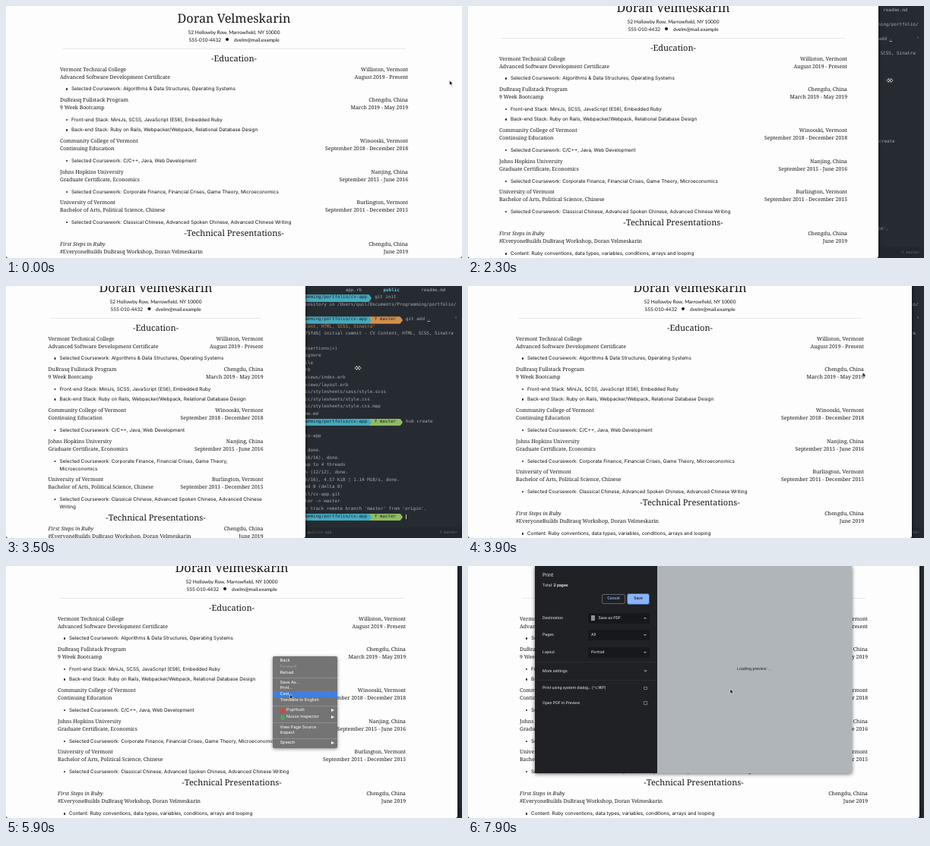
Write an HTML page that moves like this. It is 600x332 px and loops after 8 s.

```html
<!DOCTYPE html>
<html lang="en">
<head>
<meta charset="utf-8">
<title>Resume print demo</title>
<style>
html, body { margin: 0; width: 100%; height: 100%; overflow: hidden; }
body { text-rendering: geometricPrecision; }
#stage { position: relative; width: 600px; height: 332px; overflow: hidden; background: #262b31; }
#stage, #stage * { box-sizing: border-box; }
.abs, #win, #cv, #menu, #menu *, #dialog, #dialog *, #stage > svg, #bar, #thumb { position: absolute; }

/* terminal */
#term { left: 308px; top: 1.7px; isolation: isolate; color: #a4abb3; font: 5.92px/9.62px "DejaVu Sans Mono", monospace; }
#term div { height: 9.62px; white-space: pre; }
.seg { display: inline-block; position: relative; color: #1d2329; height: 9.62px;
  clip-path: polygon(0 0, calc(100% - 3.5px) 0, 100% 50%, calc(100% - 3.5px) 100%, 0 100%); }
.path { background: #45a9bd; padding-right: 6px; z-index: 1; }
.git { background: #8fbb62; padding: 0 9px 0 7px; margin-left: -3.5px; }
.dirty { background: #d2904a; }
.cmd { margin-left: 4px; }
.str { color: #d0823f; }
.dir { color: #56c4d8; font-weight: bold; }
#status { left: 300px; top: 318px; width: 300px; height: 14px; background: #22272d; color: #697078;
  font: 4.9px/14px "DejaVu Sans Mono", monospace; }
#status span { position: absolute; }

/* page */
#win { left: 0; top: 0; height: 332px; background: #fdfdfd; overflow: hidden;
  border-radius: 0 0 3px 3px; box-shadow: 0 0 5px #000b; }
#cv { top: 0; color: #161616; font: 6.9px/10px "Noto Serif", serif; }
#cv h1, #cv h2 { margin: 0; text-align: center; font-weight: 300; white-space: nowrap; }
#cv h1 { font-size: 16.2px; line-height: 20px; padding-top: 6px; height: 30.5px; }
#cv h2 { font-size: 11px; line-height: 10px; margin: -1px 0 5.7px; }
#cv hr { border: 0; margin: 5px 3px 9px; height: 1px; background: #e8e8e8; }
.contact { font: 6.5px/10px Lato, sans-serif; color: #111; text-align: center; white-space: nowrap; }
.contact i { display: inline-block; width: 4px; height: 4px; border-radius: 2px; background: #111; margin: 0 6.5px .4px; }
.entry { padding-bottom: 2.9px; }
.row { display: flex; justify-content: space-between; white-space: nowrap; position: relative; top: -.7px; }
#cv ul { margin: 4.3px 0 0; padding: 0 0 0 15px; list-style: none; font: 6.36px/10px Inter, sans-serif; color: #111; }
#cv li { position: relative; margin-bottom: 3.4px; }
#cv li::before { content: ""; position: absolute; left: -7.5px; top: 4px; width: 2.2px; height: 2.2px; border-radius: 2px; background: #222; }
#bar { right: 0; top: 0; width: 6px; height: 332px; background: #f6f6f6; border-left: 1px solid #e3e3e3; }
#thumb { left: 0; width: 4.5px; height: 179px; border-radius: 2px; background: #777; }

/* context menu */
#menu { left: 351px; top: 119px; width: 85px; height: 120.5px; background: #747474; border-radius: 2px;
  box-shadow: 0 1px 4px #0007; color: #fff; font: 5.55px/8px Inter, sans-serif; }
.item { left: 0; width: 85px; height: 8px; padding-left: 9.5px; white-space: nowrap; }
.item.off { color: #a3a3a3; }
.item.on { background: #3f7fe0; }
.item b { right: 4.5px; top: 2px; border: 2px solid transparent; border-left: 4px solid #fff; border-right: 0; }
.item i { left: 9.5px; top: 1px; width: 6.5px; height: 6.5px; border-radius: 50%; }
.item.icon { padding-left: 18px; }
.sep { left: 0; width: 85px; height: 1px; background: #8d8d8d; }

/* print dialog */
#dialog { left: 88px; top: 0; width: 417px; height: 273px; background: #202124; box-shadow: 0 1px 5px #0009;
  color: #e2e4e8; font: 5.35px/8px Roboto, sans-serif; }
#dialog * { white-space: nowrap; }
#dialog strong { position: static; }
#side, #pane { top: 0; height: 273px; }
#side { left: 0; width: 161px; }
#pane { left: 161px; width: 256px; background: #b0b5ba; }
.btn { top: 37px; height: 13px; border-radius: 2px; text-align: center; line-height: 11px; font-weight: 500; border: 1px solid #5f6368; color: #8ab4f8; }
.btn.main { background: #8ab4f8; color: #202124; border-color: #8ab4f8; box-shadow: 0 0 0 1px #3f5f94; }
.pick { left: 70px; width: 81px; height: 14px; border-radius: 2px; background: #17181b; line-height: 14px; padding-left: 4px; }
.pick::after { content: ""; position: absolute; right: 4px; top: 6px; border: 2px solid transparent; border-top: 2.5px solid #9aa0a6; border-bottom: 0; }
.rule { left: 0; width: 161px; height: 1px; background: #2c2d31; }
.ext { left: 143px; width: 4.5px; height: 4.5px; border: 1px solid #6d7176; }
#load { left: 105px; top: 132px; color: #222529; }
</style>
</head>
<body>
<div id="stage">
  <div id="term" class="abs"></div>
  <div id="status" class="abs"><span style="left:96px">quil/cv-app</span><span style="right:6px">Y master</span></div>
  <div id="win"><div id="cv"></div><div id="bar"><div id="thumb"></div></div></div>
  <div id="menu"></div>
  <div id="dialog">
    <div id="pane"><div id="load">Loading preview</div></div>
    <div id="side"></div>
  </div>
  <svg id="arrow" style="left:0;top:0" width="8" height="10" viewBox="-1 -1 8 10"><path d="M0 0V6.3L1.5 5 2.5 7.3 3.6 6.8 2.6 4.6H4.6Z" fill="#111" stroke="#fff" stroke-width=".6"/></svg>
  <svg id="resize" style="left:0;top:0" width="12" height="8" viewBox="-6 -4 12 8"><path d="M-4.2 0L-1.4-2.5V-.7H1.4V-2.5L4.2 0 1.4 2.5V.7H-1.4V2.5Z" fill="#111" stroke="#fff" stroke-width=".7"/></svg>
</div>
<script>
const $ = id => document.getElementById(id);

// Resume
const entry = (a, b, c, d, ...points) => `<div class="entry"><div class="row"><span>${a}</span><span>${b}</span></div>
  <div class="row"><span>${c}</span><span>${d}</span></div><ul>${points.map(p => `<li>${p}</li>`).join('')}</ul></div>`;
const course = 'Selected Coursework: ';
$('cv').innerHTML = `<h1>Doran Velmeskarin</h1>
  <div class="contact">52 Hollowby Row, Marrowfield, NY 10000</div>
  <div class="contact">555-010-4432<i></i>dvelm@mail.example</div><hr><h2>-Education-</h2>` +
  entry('Vermont Technical College', 'Williston, Vermont', 'Advanced Software Development Certificate', 'August 2019 - Present',
    course + 'Algorithms &amp; Data Structures, Operating Systems') +
  entry('DuBrasq Fullstack Program', 'Chengdu, China', '9 Week Bootcamp', 'March 2019 - May 2019',
    'Front-end Stack: MiniJs, SCSS, JavaScript (ES6), Embedded Ruby',
    'Back-end Stack: Ruby on Rails, Webpacker/Webpack, Relational Database Design') +
  entry('Community College of Vermont', 'Winooski, Vermont', 'Continuing Education', 'September 2018 - December 2018',
    course + 'C/C++, Java, Web Development') +
  entry('Johns Hopkins University', 'Nanjing, China', 'Graduate Certificate, Economics', 'September 2015 - June 2016',
    course + 'Corporate Finance, Financial Crises, Game Theory, Microeconomics') +
  entry('University of Vermont', 'Burlington, Vermont', 'Bachelor of Arts, Political Science, Chinese', 'September 2011 - December 2015',
    course + 'Classical Chinese, Advanced Spoken Chinese, Advanced Chinese Writing') +
  '<h2>-Technical Presentations-</h2>' +
  entry('<em>First Steps in Ruby</em>', 'Chengdu, China', '#EveryoneBuilds DuBrasq Workshop, Doran Velmeskarin', 'June 2019',
    'Content: Ruby conventions, data types, variables, conditions, arrays and looping') +
  entry('<em>Chat Kit</em>', 'Chengdu, China', 'Final Project Demo', 'May 2019');

// Terminal
const prompt = (cmd, git) => '<span class="seg path">       ~/Documents/Programming/portfolio/cv-app</span>' +
  (git ? `<span class="seg git ${git}">Y master</span>` : '') + `<span class="cmd">${cmd}</span>`;
const made = ['.gitignore', 'Gemfile', 'app.rb', 'app/views/index.erb', 'app/views/layout.erb', 'public/stylesheets/sass/style.scss',
  'public/stylesheets/style.css', 'public/stylesheets/style.css.map', 'readme.md'].map(f => ' create mode 100644 ' + f);
$('term').innerHTML = [
  ' '.repeat(39) + 'app.rb        <span class="dir">public</span>        readme.md',
  prompt('git init'),
  'Initialized empty Git repository in /Users/quil/Documents/Programming/portfolio/', '',
  prompt('git add <u>.</u>         <span class="str">"</span>', 'dirty'),
  `<span class="str">${'CV Content, HTML, SCSS, Sinatra"'.padStart(50)}</span>`,
  '[master (root-commit) 3a75fd6] initial commit - CV Content, HTML, SCSS, Sinatra', '',
  ' 12 files changed, 250 insertions(+)', ...made,
  prompt('hub create', 'clean'), '',
  'https://github.com/quil/cv-app', '',
  'Enumerating objects: 16, done.', 'Counting objects: 100% (16/16), done.',
  'Delta compression using up to 4 threads', 'Compressing objects: 100% (12/12), done.',
  'Writing objects: 100% (16/16), 4.57 KiB | 1.14 MiB/s, done.',
  'Total 16 (delta 0), reused 0 (delta 0)', 'To https://github.com/quil/cv-app.git',
  ' * [new branch]      master -> master',
  "Branch 'master' set up to track remote branch 'master' from 'origin'.",
  prompt('<span style="border-left:1px solid #c8ced4"> </span>', 'clean'),
].map(l => `<div>${l}</div>`).join('');

// Context menu: label, centre y, class, icon colour
const items = [['Back', 125], ['Forward', 132.7, 'off'], ['Reload', 140.5], ['Save As...', 153.5], ['Print...', 161.4],
  ['Cast...', 169.3], ['Translate to English', 177.2], ['PopHush', 190.3, 'icon', '#cf4a3c'],
  ['Nuvox Inspector', 199, 'icon', '#5c9a6c'], ['View Page Source', 212.5], ['Inspect', 220.4], ['Speech', 233.4]];
$('menu').innerHTML = items.map(([label, y, cls = '', color]) =>
  `<div class="item ${cls}" style="top:${y - 123}px">${color ? `<i style="background:${color}"></i>` : ''}${label}${color || label == 'Speech' ? '<b></b>' : ''}</div>`).join('') +
  [147, 183.5, 206, 227].map(y => `<div class="sep" style="top:${y - 119}px"></div>`).join('');
const rows = [...document.querySelectorAll('.item')];

// Print dialog
const label = (text, y, size = 5.35) => `<div style="left:10px;top:${y - 4}px;font-size:${size}px">${text}</div>`;
const pick = (name, y, value) => label(name, y) + `<div class="pick" style="top:${y - 7}px">${value}</div>`;
const ext = y => `<div class="ext" style="top:${y - 2.2}px"></div>`;
$('side').innerHTML = label('Print', 12, 6.8) + label('Total: <strong>2 pages</strong>', 25.5) +
  '<div class="btn" style="left:88px;width:31px">Cancel</div><div class="btn main" style="left:122px;width:28px">Save</div>' +
  pick('Destination', 68.5, '<i style="left:4px;top:3.5px;width:5px;height:7px;background:#8d9196"></i><span style="left:13.5px">Save as PDF</span>') +
  pick('Pages', 91, 'All') + pick('Layout', 113.5, 'Portrait') +
  '<div class="rule" style="top:126px"></div>' + label('More settings', 138.5) +
  '<div style="left:143.5px;top:136px;width:3px;height:3px;border:solid #9aa0a6;border-width:0 .8px .8px 0;transform:rotate(45deg)"></div>' +
  '<div class="rule" style="top:150px"></div>' +
  label('Print using system dialog… (⌥⌘P)', 161) + ext(161) + label('Open PDF in Preview', 180.5) + ext(180.5);
for (let i = 0; i < 3; i++) $('load').insertAdjacentHTML('beforeend', `<span class="dot" style="left:${39 + i * 2.6}px">.</span>`);
const dots = [...document.querySelectorAll('.dot')];

// Keys are [time, value, ...]
const widths = [[2000, 600], [2100, 592], [2300, 540], [2500, 470], [2700, 422], [2800, 416], [2900, 414], [3000, 406],
  [3200, 396], [3500, 394], [3600, 430], [3700, 500], [3800, 570], [3900, 584], [4000, 591], [4200, 594]];
const scrolls = [[700, 0], [1100, 30], [1200, 30], [1400, 22], [1700, 14]];
const moves = [[100, 583.5, 98], [400, 593.5, 96], [2000, 594, 96], [2300, 555, 98], [2500, 509, 100], [2800, 474, 103],
  [3500, 463, 108], [3800, 575, 112], [4200, 352, 119], [4500, 352, 119], [4900, 373.5, 183.5], [5200, 375, 201],
  [5500, 374, 193], [6000, 373.5, 163], [7100, 373.5, 163], [7500, 361, 198], [7900, 345, 162]];

function at(keys, t) {
  const i = keys.findIndex(k => k[0] > t);
  if (i < 0) return keys[keys.length - 1].slice(1);
  if (!i) return keys[0].slice(1);
  const a = keys[i - 1], b = keys[i], f = (t - a[0]) / (b[0] - a[0]);
  return a.slice(1).map((v, j) => v + (b[j + 1] - v) * f);
}
const show = (id, on) => $(id).style.visibility = on ? 'visible' : 'hidden';
const place = (id, x, y) => $(id).style.transform = `translate(${x}px,${y}px)`;
const start = performance.now();

function draw() {
  const t = Math.floor((performance.now() - start) % 8000 / 100) * 100;
  const [w] = at(widths, t), [scroll] = at(scrolls, t), [x, y] = at(moves, t);

  // responsive container steps
  const col = w >= 494 ? 458 : w >= 409 ? 382 : w >= 316 ? 283 : 210;
  $('win').style.width = w + 'px';
  $('cv').style.width = col + 'px';
  place('cv', (w - col) / 2, -scroll);
  show('bar', t >= 800 && t < 2100);
  place('thumb', 0, scroll * .54);

  show('menu', t >= 4400 && t < 6100);
  rows.forEach((row, i) => row.classList.toggle('on', t >= 4600 && items[i][2] != 'off' && Math.abs(y - items[i][1]) < 4));

  show('dialog', t >= 6500);
  show('pane', t >= 6700);
  show('side', t >= 7200);
  show('load', t >= 7200);
  dots.forEach((dot, i) => dot.style.top = -3 * Math.max(0, Math.sin((t - 7900) / 1000 * 2 * Math.PI + 1.5 - i * 1.6)) + 'px');

  const sizing = t >= 2100 && t <= 3800;
  show('arrow', !sizing);
  show('resize', sizing);
  place('arrow', x - 1, y - 1);
  place('resize', x - 6, y - 4);
  requestAnimationFrame(draw);
}
draw();
</script>
</body>
</html>
```
